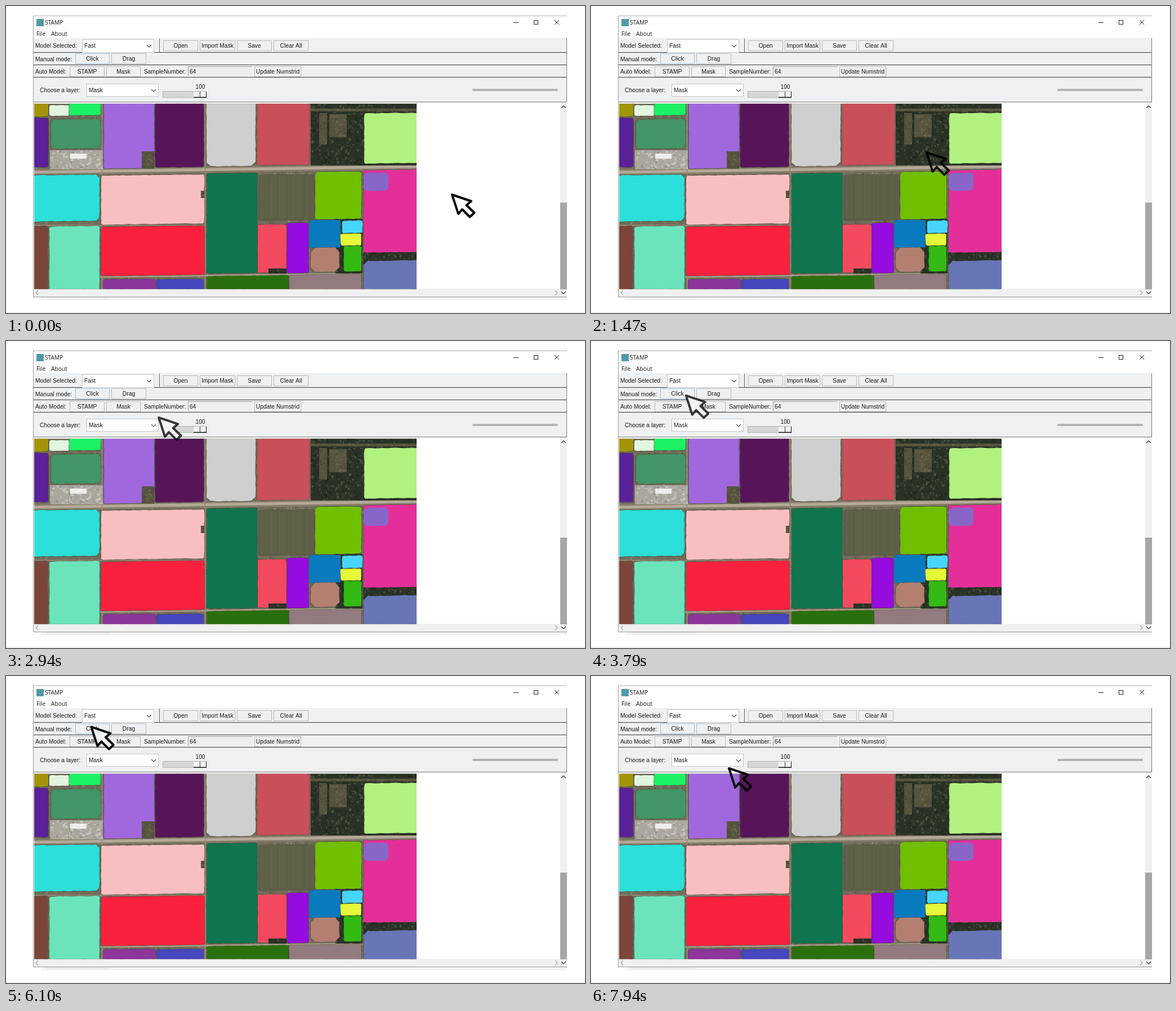
These frames come from a looping animation (1028x545 px, 8 s). An HTML page with a canvas:

```html
<!DOCTYPE html>
<html lang="en">
<head>
<meta charset="utf-8">
<title>STAMP</title>
<style>
html, body { margin: 0; width: 100%; height: 100%; overflow: hidden; background: #fff; }
canvas { display: block; width: 1028px; height: 545px; }
</style>
</head>
<body>
<canvas id="stage" width="1028" height="545"></canvas>
<script>
const LOOP = 8000, STEP = 64;
const view = document.getElementById('stage').getContext('2d');
const scene = document.createElement('canvas');
scene.width = 1028;
scene.height = 545;
const c = scene.getContext('2d');
c.lineJoin = 'round';

let seed = 7;
function rand() {
  seed = (seed * 16807) % 2147483647;
  return seed / 2147483647;
}

function box(x, y, w, h, color) {
  c.fillStyle = color;
  c.fillRect(x, y, w, h);
}

function frame(x, y, w, h, edge, fill) {
  box(x, y, w, h, edge);
  box(x + 1, y + 1, w - 2, h - 2, fill);
}

function line(x0, y0, x1, y1, color, width = 1) {
  c.beginPath();
  c.moveTo(x0, y0);
  c.lineTo(x1, y1);
  c.strokeStyle = color;
  c.lineWidth = width;
  c.stroke();
}

function label(s, x, y, align = 'left', font = '10.3px "Liberation Sans", Arial, sans-serif') {
  c.font = font;
  c.textAlign = align;
  c.fillStyle = '#181818';
  c.fillText(s, x, y);
}

function button(s, x, y, w, edge = '#b8babc') {
  frame(x, y, w, 19, edge, '#eef0f1');
  label(s, x + w / 2, y + 13, 'center');
}

function combo(s, x, y, w, h) {
  frame(x, y, w, h, '#c4c4c4', '#fff');
  label(s, x + 4, y + 15);
  chevron(x + w - 9, y + 12, 0, '#555');
}

function chevron(x, y, turn, color) {
  c.save();
  c.translate(x, y);
  c.rotate(turn * Math.PI / 2);
  line(-4, -2, 0, 2, color, 1.2);
  line(0, 2, 4, -2, color, 1.2);
  c.restore();
}

function drawWindow() {
  box(0, 0, 1028, 545, '#fff');
  box(0, 544, 1028, 1, '#e2e2e2');
  box(63, 517, 933, 5, '#f3f3f3');
  box(72, 517, 114, 4, '#ebebeb');
  box(48, 17, 948, 1, '#b0b0b0');
  box(48, 17, 1, 500, '#999');
  box(48, 516, 948, 1, '#999');

  box(54, 23, 13, 13, '#4f9aa6');
  const ui = '10.2px "Open Sans", sans-serif';
  label('STAMP', 69, 33, 'left', ui);
  label('File', 54, 53, 'left', ui);
  label('About', 80, 53, 'left', ui);
  box(901, 29, 9, 1, '#222');
  frame(937, 25, 8, 8, '#222', '#fff');
  line(974, 25, 982, 33, '#222');
  line(982, 25, 974, 33, '#222');

  box(49, 57, 947, 114, '#eef0f2');
  for (const y of [82, 104, 126]) box(49, y, 947, 1, '#3a3a3a');
  box(49, 170, 947, 1, '#777');
  box(995, 57, 1, 114, '#777');
  box(272, 58, 1, 25, '#666');

  label('Model Selected:', 52, 74);
  combo('Fast', 135, 59, 128, 24);
  button('Open', 279, 61, 62);
  button('Import Mask', 344, 61, 63);
  button('Save', 410, 61, 62);
  button('Clear All', 475, 61, 62);

  label('Manual mode:', 52, 98);
  button('Click', 123, 84, 61, '#9cc3dc');
  button('Drag', 187, 84, 62);

  label('Auto Model:', 52, 120);
  button('STAMP', 113, 107, 62);
  button('Mask', 178, 107, 61);
  label('SampleNumber:', 245, 120);
  box(323, 107, 114, 17, '#999');
  box(324, 108, 113, 16, '#eceeef');
  label('64', 326, 120);
  button('Update Numstrid', 441, 107, 83);

  label('Choose a layer:', 60, 153);
  combo('Mask', 143, 138, 128, 23);
  label('100', 345, 147, 'center');
  frame(278, 151, 78, 12, '#b4b4b4', '#d5d6d7');
  box(333, 152, 23, 11, '#111');
  box(333, 152, 22, 9.5, '#f2f2f2');
  box(344, 152, 1, 10, '#333');
  c.lineCap = 'round';
  line(830, 149, 978, 149, '#b3b3b5', 4);
  c.lineCap = 'butt';

  box(984, 171, 12, 345, '#f0f0f0');
  box(49, 502, 947, 14, '#f0f0f0');
  box(984, 349, 12, 154, '#a6a6a6');
  chevron(990, 179, 2, '#444');
  chevron(990, 509, 0, '#444');
  chevron(55, 509, 1, '#aaa');
  chevron(977, 509, 3, '#aaa');
}

// Textured ground: a base colour strewn with small pieces of the others.
function ground(x, y, w, h, grain, base, ...tones) {
  c.save();
  c.beginPath();
  c.rect(x, y, w, h);
  c.clip();
  box(x, y, w, h, base);
  for (let n = w * h / 30; n > 0; n--) {
    const tone = tones[Math.floor(rand() * tones.length)];
    box(x + rand() * w, y + rand() * h, 1 + rand() * grain, 1 + rand() * grain, tone);
  }
  c.restore();
}

const woods = (x, y, w, h) => ground(x, y, w, h, 4, '#2a3226', '#222a1f', '#333b2b', '#48503b');
const scrub = (x, y, w, h) => ground(x, y, w, h, 4, '#55553f', '#4a4c38', '#666049');

// A slightly tilted block with cut corners and ragged edges.
function outline(x0, y0, x1, y1, cut) {
  const lean = (x1 - x0) * .006;
  const corners = [
    [x0, y0 + cut + lean], [x0 + cut, y0 + lean], [x1 - cut, y0 - lean], [x1, y0 + cut - lean],
    [x1, y1 - cut - lean], [x1 - cut, y1 - lean], [x0 + cut, y1 + lean], [x0, y1 - cut + lean]
  ];
  c.beginPath();
  corners.forEach(([x, y], i) => {
    const [nx, ny] = corners[(i + 1) % corners.length];
    const parts = Math.ceil(Math.hypot(nx - x, ny - y) / 6);
    for (let k = 0; k < parts; k++) {
      c.lineTo(x + (nx - x) * k / parts + rand() - .5, y + (ny - y) * k / parts + rand() - .5);
    }
  });
  c.closePath();
}

function plot(color, x0, y0, x1, y1, cut = 2) {
  outline(x0, y0, x1, y1, cut);
  c.strokeStyle = 'rgba(55,56,42,.5)';
  c.lineWidth = 1.6;
  c.stroke();
  c.fillStyle = color;
  c.fill();
}

function drawLand() {
  ground(50, 173, 679, 330, 3, '#716c59', '#7c7563', '#625f4a', '#878070');
  line(50, 295, 729, 285, '#857c69', 11);
  line(50, 295, 729, 285, '#b5a999', 5);
  line(50, 389.5, 353, 389.5, '#978b76', 2);
  line(167, 481, 633, 475, '#a99d87', 3);
  for (const x of [170.5, 353.5]) line(x, 173, x, 502, '#968b76', 2);

  ground(78, 256, 94, 34, 4, '#aaa79e', '#bdbab2', '#96938a', '#c8c5be');
  box(114, 262, 29, 9, '#eeeeea');
  woods(541, 173, 188, 110);
  scrub(541, 182, 188, 5);
  scrub(574, 192, 31, 41);
  scrub(556, 190, 14, 56);
  woods(585, 378, 48, 97);
  woods(634, 437, 95, 22);
}

function drawPlots() {
  plot('#a39406', 40, 160, 75, 196);
  plot('#e2f5df', 77, 176, 112, 195);
  plot('#1cf064', 112, 160, 168, 194);
  plot('#5b2198', 40, 199, 75, 286);
  plot('#429668', 80, 201, 168, 253, 5);
  plot('#a168de', 174, 160, 263, 288);
  plot('#561559', 265, 160, 351, 286);
  plot('#cfcfcf', 356, 160, 443, 284, 7);
  plot('#c9505b', 446, 160, 539, 282);
  plot('#b1f180', 636, 190, 740, 279);

  plot('#2be0d9', 40, 300, 166, 382, 6);
  plot('#f8bfc1', 169, 300, 352, 387);
  plot('#10744e', 357, 297, 446, 474);
  plot('#5d5f46', 449, 300, 547, 380);
  for (let x = 454; x < 545; x += 4) line(x, 303, x, 377, `rgba(125,125,95,${rand() * .2})`, 3);
  plot('#70bf00', 549, 294, 631, 378, 3);
  plot('#e42f9a', 635, 291, 740, 437);
  outline(635, 296, 679, 328, 5);
  c.fillStyle = '#8766c8';
  c.fill();

  plot('#7b4539', 40, 391, 74, 520);
  plot('#6be4bc', 77, 391, 166, 520);
  plot('#fa213e', 169, 391, 352, 478);
  plot('#f34a5f', 447, 388, 498, 473);
  plot('#960bdf', 499, 385, 537, 474);
  plot('#0a7abf', 538, 380, 594, 429);
  plot('#47d5fc', 597, 381, 633, 403);
  plot('#e5f839', 594, 404, 631, 425);
  plot('#33ba14', 600, 426, 631, 471);
  plot('#b27f71', 541, 429, 592, 472, 8);

  plot('#8c359b', 173, 485, 265, 520);
  plot('#4646bd', 267, 485, 351, 520);
  plot('#2a6f0e', 357, 479, 502, 520);
  plot('#927b7f', 503, 477, 631, 520);
  plot('#6876b7', 635, 452, 740, 520, 7);

  scrub(241, 258, 22, 31);
  scrub(346, 328, 6, 13);
  woods(466, 466, 32, 9);
}

function drawMap() {
  c.save();
  c.beginPath();
  c.rect(50, 173.5, 679, 329);
  c.clip();
  drawLand();
  drawPlots();
  c.restore();
}

// Ease in and out, with the handles at times a and b.
function ease(u, a, b) {
  if (u >= 1) return 1;
  let low = 0, high = 1, s;
  for (let i = 0; i < 20; i++) {
    s = (low + high) / 2;
    const x = 3 * s * (1 - s) * ((1 - s) * a + s * b) + s ** 3;
    if (x < u) low = s; else high = s;
  }
  return s * s * (3 - 2 * s);
}

const START = [790, 333], REST = [149, 88], LEAVE = 5760;

// Glide to the button, rest there, then speed away.
function tip(t) {
  if (t < LEAVE) {
    const p = ease(t / 4350, .31, .535);
    return START.map((v, i) => v + (REST[i] - v) * p);
  }
  const d = 94 * ((t - LEAVE) / 2176) ** 2.85;
  return [REST[0] + d, REST[1] + d * .787];
}

const arrow = new Path2D('M2 2L13 36L20 28L33.5 41.5L41.5 34L27.5 20.5L36 13.5Z');

function drawCursor(t) {
  const [x, y] = tip(t);
  const ink = .88 + .12 * Math.cos(2 * Math.PI * t / 7000);
  view.save();
  view.beginPath();
  view.rect(0, 0, 1028, 171);
  view.clip();
  view.translate(x, y);
  view.fillStyle = '#f0f1f2';
  view.fill(arrow);
  view.restore();

  view.save();
  view.translate(x, y);
  view.lineJoin = 'round';
  view.lineWidth = 4;
  view.strokeStyle = `rgba(0,0,0,${ink})`;
  view.stroke(arrow);
  view.restore();
}

function tick() {
  const t = Math.floor((performance.now() % LOOP) / STEP) * STEP;
  view.drawImage(scene, 0, 0);
  drawCursor(t);
  requestAnimationFrame(tick);
}

drawWindow();
drawMap();
tick();
</script>
</body>
</html>
```
